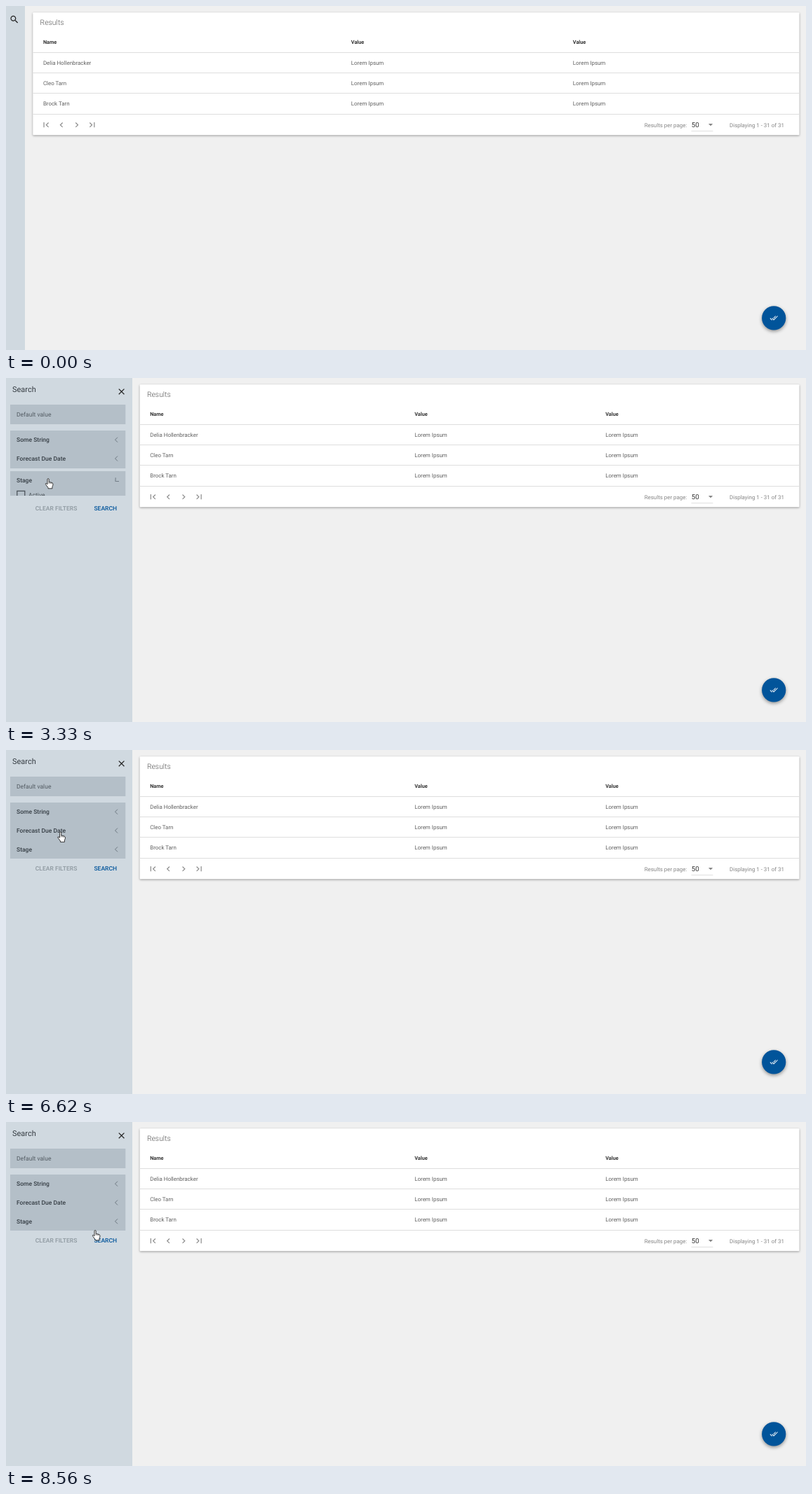
Write an HTML page with a canvas that moves like this. It is 1140 px wide and 491 px high and loops after 8610 ms.

```html
<!DOCTYPE html>
<html lang="en">
<head>
<meta charset="utf-8">
<title>Search panel</title>
<style>
  html, body { margin: 0; width: 100%; height: 100%; overflow: hidden; background: #f0f0f0; }
  canvas { display: block; }
</style>
</head>
<body>
<canvas id="stage" width="1140" height="491"></canvas>
<script>
const ctx = document.getElementById('stage').getContext('2d');
const LOOP = 8610;
const BLUE = '#01549a';
const PANEL = '#b4bfc8';
const ROW = 26.8;
const GAP = 9.2;

// 24-unit icons
const icons = {
  search: 'M15.5 14h-.79l-.28-.27C15.41 12.59 16 11.11 16 9.5 16 5.91 13.09 3 9.5 3S3 5.91 3 9.5 5.91 16 9.5 16c1.61 0 3.09-.59 4.23-1.57l.27.28v.79l5 4.99L20.49 19l-4.99-5zm-6 0C7.01 14 5 11.99 5 9.5S7.01 5 9.5 5 14 7.01 14 9.5 11.99 14 9.5 14z',
  close: 'M19 6.41L17.59 5 12 10.59 6.41 5 5 6.41 10.59 12 5 17.59 6.41 19 12 13.41 17.59 19 19 17.59 13.41 12z',
  first: 'M18.41 16.59L13.82 12l4.59-4.59L17 6l-6 6 6 6zM6 6h2v12H6z',
  prev: 'M15.41 7.41L14 6l-6 6 6 6 1.41-1.41L10.83 12z',
  next: 'M10 6L8.59 7.41 13.17 12l-4.58 4.59L10 18l6-6z',
  last: 'M5.59 7.41L10.18 12l-4.59 4.59L7 18l6-6-6-6zM16 6h2v12h-2z',
  doneAll: 'M18 7l-1.41-1.41-6.34 6.34 1.41 1.41L18 7zm4.24-1.41L11.66 16.17 7.48 12l-1.41 1.41L11.66 19l12-12-1.42-1.41zM.41 13.41L6 19l1.41-1.41L1.83 12 .41 13.41z'
};
for (const name in icons) icons[name] = new Path2D(icons[name]);
const hand = new Path2D('M3 1.2a1.1 1.1 0 0 1 2.2 0V5l1 .1 1.4.3 1.4.4 1.1.5q.9.5.9 1.6 0 2-1.1 4V14.3H4V13L1.2 9.2Q-.2 7.5.6 7q.9-.5 2.4 1.2Z');
const knuckles = new Path2D('M5.2 5v2.4M7.2 5.4v2.2M9.1 5.9v2');
const arrow = new Path2D('M0 0V10.5L2.5 8.2 4.2 12 5.8 11.3 4.2 7.6H7.5Z');

const clamp = v => Math.max(0, Math.min(1, v));
const span = (t, from, to) => clamp((t - from) / (to - from));
const mix = (a, b, p) => a + (b - a) * p;
const smooth = p => p * p * (3 - 2 * p);
const easeOut = p => p * (2 - p);
const bezier = (x1, y1, x2, y2) => x => {
  const curve = (a, b, s) => 3 * (1 - s) * (1 - s) * s * a + 3 * (1 - s) * s * s * b + s ** 3;
  let lo = 0, hi = 1;
  for (let i = 0; i < 20; i++) {
    const mid = (lo + hi) / 2;
    if (curve(x1, x2, mid) < x) lo = mid; else hi = mid;
  }
  return curve(y1, y2, lo);
};
const swift = bezier(.4, 0, .2, 1);
const easeIn = bezier(.42, 0, 1, 1);
const toggle = (t, on, off, ease) => ease(span(t, on, on + 225)) - ease(span(t, off, off + 225));

function text(str, x, midY, size, color, weight = 400) {
  ctx.font = `${weight} ${size}px Roboto, sans-serif`;
  ctx.fillStyle = color;
  ctx.fillText(str, x, midY + size * .355);
}
function rect(x, y, w, h, color) {
  ctx.fillStyle = color;
  ctx.fillRect(x, y, w, h);
}
function disc(x, y, r, color) {
  ctx.fillStyle = color;
  ctx.beginPath();
  ctx.arc(x, y, r, 0, Math.PI * 2);
  ctx.fill();
}
function line(points, color, width) {
  ctx.strokeStyle = color;
  ctx.lineWidth = width;
  ctx.beginPath();
  points.forEach(p => ctx.lineTo(...p));
  ctx.stroke();
}
function icon(name, x, y, color, scale = .61) {
  ctx.save();
  ctx.translate(x, y);
  ctx.scale(scale, scale);
  ctx.translate(-12, -12);
  ctx.fillStyle = color;
  ctx.fill(icons[name]);
  ctx.restore();
}
function shadow(color, blur, dy) {
  ctx.shadowColor = color;
  ctx.shadowBlur = blur;
  ctx.shadowOffsetY = dy;
}

function drawResults(left) {
  const shift = left - 38.3;
  const columns = [left + 14.6, 491.8 + shift * .594, 807.8 + shift * .305];
  const row = (cells, y, size, color, weight) =>
    cells.forEach((cell, i) => text(cell, columns[i], y, size, color, weight));

  ctx.save();
  shadow('rgba(0,0,0,.38)', 3, 1);
  ctx.fillStyle = '#fff';
  ctx.beginPath();
  ctx.roundRect(left, 9.3, 1130.5 - left, 175, 1);
  ctx.fill();
  ctx.restore();

  text('Results', left + 10.3, 23.3, 10.4, '#555', 300);
  row(['Name', 'Value', 'Value'], 51.7, 7.3, '#333', 700);
  ['Delia Hollenbracker', 'Cleo Tarn', 'Brock Tarn'].forEach((name, i) =>
    row([name, 'Lorem Ipsum', 'Lorem Ipsum'], 80.7 + i * 29.2, 7.93, '#606060'));
  for (const y of [66, 95, 124, 154]) rect(left, y, 1130.5 - left, 1, '#dedede');

  ['first', 'prev', 'next', 'last'].forEach((name, i) =>
    icon(name, left + 18.8 + i * 21.9, 169.7, '#8c8c8c'));
  text('Results per page:', 909.7, 169.7, 7.93, '#858585');
  text('50', 976.7, 169.7, 9.76, '#333');
  ctx.fillStyle = '#858585';
  ctx.beginPath();
  ctx.moveTo(1001, 168);
  ctx.lineTo(1007.2, 168);
  ctx.lineTo(1004.1, 171.2);
  ctx.fill();
  rect(976.5, 178, 31, 1, '#e0e0e0');
  text('Displaying 1 - 31 of 31', 1031, 169.7, 7.93, '#858585');
}

function drawFab() {
  ctx.save();
  shadow('rgba(0,0,0,.4)', 5, 2);
  disc(1094.2, 445.4, 17.1, BLUE);
  ctx.restore();
  icon('doneAll', 1094.2, 445.3, '#fff', .49);
}

function checkbox(label, y, checked) {
  if (checked) {
    ctx.fillStyle = BLUE;
    ctx.beginPath();
    ctx.roundRect(15.2, y - 6, 12.2, 12.2, 1);
    ctx.fill();
    line([[17.3, y + .2], [20, y + 3], [25.4, y - 2.8]], '#fff', 1.3);
  } else {
    ctx.strokeStyle = '#454d54';
    ctx.lineWidth = 1.2;
    ctx.strokeRect(15.8, y - 5.4, 11, 11);
  }
  text(label, 32, y, 8.54, '#4a5258');
}

function dateField(label, y) {
  text(label, 15, y, 6.4, '#7a858d');
  text('05/06/2017', 15, y + 11, 8.54, '#40484e');
  rect(15, Math.round(y + 18.5), 97, 1, '#a3aeb7');
}

function drawStageOptions(y, t) {
  checkbox('Active', y + 33.8, t > 4620);
  checkbox('Approved', y + 48.4, false);
  const ripple = span(t, 4600, 5100);
  if (ripple > 0 && ripple < 1)
    disc(21.3, y + 33.8, 15 * easeOut(ripple), `rgba(1,84,154,${.28 * (1 - ripple)})`);
}

function drawDates(y) {
  dateField('From', y + 30);
  dateField('To', y + 61);
}

const sections = [
  { title: 'Some String', extra: 0, on: LOOP, off: LOOP },
  { title: 'Forecast Due Date', extra: 68, on: 6865, off: 7845, body: drawDates },
  { title: 'Stage', extra: 28.8, on: 3270, off: 5950, body: drawStageOptions }
];

function drawSection({ title, extra, on, off, body }, y, turn, t) {
  const height = ROW + extra * toggle(t, on, off, swift);
  const top = Math.round(y);
  const bottom = Math.round(y + height);
  ctx.save();
  ctx.beginPath();
  ctx.rect(6, top, 164.3, bottom - top);
  ctx.clip();
  rect(6, top, 165, bottom - top, PANEL);
  text(title, 15, y + 13.1, 8.54, '#363e45', 500);
  if (body && height > ROW + .1) body(y, t);
  ctx.translate(157.2, y + 13.2);
  ctx.rotate(-turn * Math.PI / 2);
  line([[1.8, -3.5], [-1.7, 0], [1.8, 3.5]], '#6c7780', 1);
  ctx.restore();
  return y + height;
}

function drawSidebar(t, progress) {
  const width = mix(27, 180, progress);
  rect(0, 0, width, 491, '#d0d9e0');

  ctx.save();
  ctx.translate(width - 180, 0);
  ctx.globalAlpha = clamp(progress * 1.25);
  text('Search', 9, 16.3, 10.98, '#343b41');
  rect(6, 38, 164.3, 28, PANEL);
  text('Default value', 15, 52, 8.54, '#535c63');

  let y = 75;
  let lastTurn = 0;
  sections.forEach((section, i) => {
    const turn = toggle(t, section.on, section.off, easeOut);
    if (i) y += GAP * Math.max(turn, lastTurn);
    y = drawSection(section, y, turn, t);
    lastTurn = turn;
  });
  y += GAP * lastTurn + 13.5;
  text('CLEAR FILTERS', 41.8, y, 8.54, '#8d989f', 500);
  text('SEARCH', 125.4, y, 8.54, BLUE, 500);
  ctx.restore();

  const buttonX = width - 15.4;
  if (progress > .01 && progress < .98) disc(buttonX, 19.5, 12.3, 'rgba(60,70,76,.26)');
  if (progress < .03) icon('search', buttonX + .3, 19.3, '#222');
  else icon('close', buttonX, 19.4, progress < .25 ? '#2f9148' : '#222');
}

// time, x and y of the pointer's tip
const pointerPath = [
  [180, 1034, 482], [1000, 27, 19], [1180, 20, 19.5],
  [2200, 20, 19.5], [2480, 140, 60], [2950, 60, 143.5],
  [3600, 60, 143.5], [4060, 45, 187], [4250, 45, 187], [4520, 20, 171.5],
  [5120, 20, 171.5], [5180, 19.5, 177], [5440, 19.5, 177],
  [5500, 20, 186], [5760, 58.5, 147.5], [6250, 58.5, 147.5],
  [6620, 77.5, 117], [8380, 77.5, 117], [8560, 127, 154.5]
];

function drawPointer(t) {
  if (t < pointerPath[0][0]) return;
  let i = pointerPath.findIndex(key => key[0] > t);
  if (i < 0) i = pointerPath.length - 1;
  const [t0, x0, y0] = pointerPath[i - 1];
  const [t1, x1, y1] = pointerPath[i];
  const p = smooth(span(t, t0, t1));
  const x = mix(x0, x1, p);
  const y = mix(y0, y1, p);
  const isHand = x < 30 || (x < 171 && y > 75 && t > 2200);

  ctx.save();
  ctx.translate(isHand ? x - 4 : x, y);
  ctx.fillStyle = '#fff';
  ctx.strokeStyle = '#222';
  ctx.lineWidth = .9;
  ctx.lineJoin = 'round';
  ctx.fill(isHand ? hand : arrow);
  ctx.stroke(isHand ? hand : arrow);
  if (isHand) {
    ctx.lineWidth = .6;
    ctx.stroke(knuckles);
  }
  ctx.restore();
}

function frame(now) {
  const t = now % LOOP;
  ctx.textRendering = 'geometricPrecision';
  rect(0, 0, 1140, 491, '#f0f0f0');
  drawResults(mix(38.3, 190.6, span(t, 1685, 1990)));
  drawFab();
  drawSidebar(t, easeIn(span(t, 1597, 1989)));
  drawPointer(t);
  requestAnimationFrame(frame);
}
requestAnimationFrame(frame);
</script>
</body>
</html>
```
